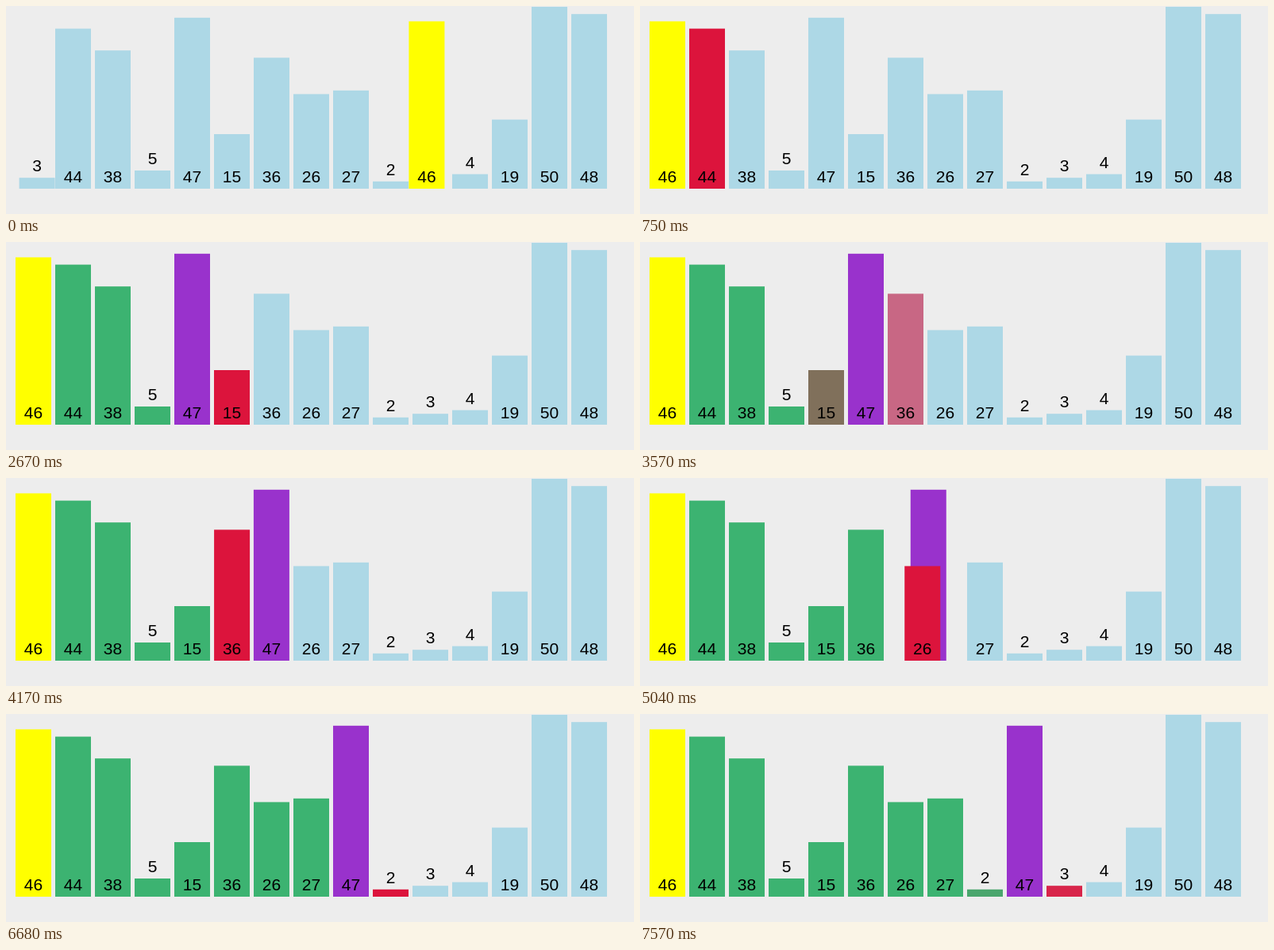
Animation of 791x263 px, one loop 8000 ms. Source, as an HTML page:

```html
<!DOCTYPE html>
<html lang="en">
<head>
<meta charset="utf-8">
<title>Quicksort partition</title>
<style>
  html, body { margin: 0; width: 100%; height: 100%; overflow: hidden; background: #ededed; }
  svg { display: block; }
  text { font: 21px "Liberation Sans", Arial, sans-serif; text-anchor: middle; }
</style>
</head>
<body>
<svg id="stage" width="791" height="263" viewBox="0 0 791 263"></svg>
<script>
const VALUES = [3, 44, 38, 5, 47, 15, 36, 26, 27, 2, 46, 4, 19, 50, 48];
const PIVOT = 46, LAST_SLOT = 10;
const BLUE = [173, 216, 230], YELLOW = [255, 255, 0], RED = [220, 20, 60],
      GREEN = [60, 179, 113], PURPLE = [153, 50, 204];

const LOOP = 8000, FIRST_STEP = -33, STEP = 494.7, EASE_TIME = 250;
const TICK = 148.4;                                  // sampling interval of the motion
const SHORT_TICKS = new Set([6, 13, 16, 29, 30, 33, 37, 48]);  // shown 140 ms, others 150 ms
const TICKS = 52;

const BASE = 231, UNIT = 4.6, BAR_WIDTH = 45;

// Run the partition, keeping a snapshot of all bars after each step.
function partition() {
  let bars = VALUES.map((value, slot) => ({ value, slot, color: value === PIVOT ? YELLOW : BLUE }));
  const states = [];
  const save = () => states.push(bars.map(bar => ({ ...bar })));
  const at = slot => bars.find(bar => bar.slot === slot);
  const swap = (a, b) => { [a.slot, b.slot] = [b.slot, a.slot]; save(); };

  save();
  swap(at(0), at(VALUES.indexOf(PIVOT)));
  let store = 1;
  for (let slot = 1; slot <= LAST_SLOT; slot++) {
    const bar = at(slot);
    bar.color = RED;
    save();
    if (slot === LAST_SLOT) break;
    if (bar.value < PIVOT) {
      if (store < slot) swap(bar, at(store));
      store++;
      bar.color = GREEN;
    } else {
      bar.color = PURPLE;
    }
  }
  return states;
}

const states = partition();
const stage = document.getElementById("stage");

function add(parent, tag, attributes = {}) {
  const node = document.createElementNS("http://www.w3.org/2000/svg", tag);
  for (const name in attributes) node.setAttribute(name, attributes[name]);
  return parent.appendChild(node);
}

const views = VALUES.map(value => {
  const group = add(stage, "g");
  const height = value * UNIT, top = BASE - height;
  const rect = add(group, "rect", { y: top, width: BAR_WIDTH, height });
  const baseline = (value < 10 ? top : BASE) - 8;
  add(group, "text", { x: BAR_WIDTH / 2, y: baseline }).textContent = value;
  return { group, rect };
});

const mix = (a, b, p) => a + (b - a) * p;
const clamp = t => Math.min(1, Math.max(0, t));
const cubicInOut = t => t < 0.5 ? 4 * t ** 3 : 1 - 4 * (1 - t) ** 3;

function tickAt(time) {
  let tick = 0, end = 0;
  while (tick < TICKS - 1) {
    end += SHORT_TICKS.has(tick) ? 140 : 150;
    if (time < end) break;
    tick++;
  }
  return tick;
}

function draw(time) {
  const elapsed = tickAt(time) * TICK - FIRST_STEP;
  const step = Math.min(states.length - 2, Math.floor(elapsed / STEP));
  const p = cubicInOut(clamp((elapsed - step * STEP) / EASE_TIME));
  views.forEach(({ group, rect }, i) => {
    const from = states[step][i], to = states[step + 1][i];
    const color = from.color.map((c, k) => Math.round(mix(c, to.color[k], p)));
    group.setAttribute("transform", `translate(${12 + 50 * mix(from.slot, to.slot, p)})`);
    rect.setAttribute("fill", `rgb(${color})`);
  });
}

const start = performance.now();
function frame() {
  draw((performance.now() - start) % LOOP);
  requestAnimationFrame(frame);
}
frame();
</script>
</body>
</html>
```
